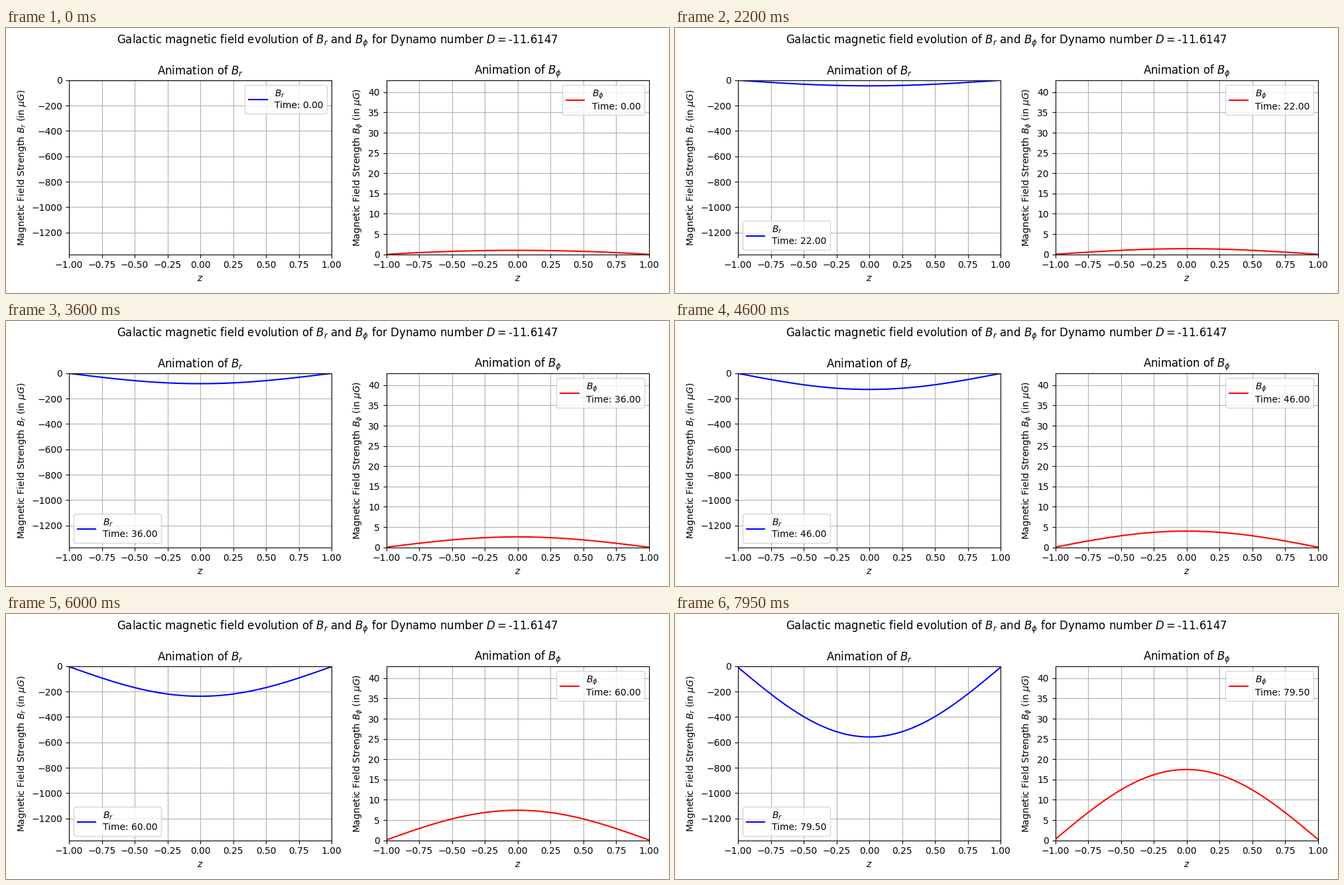
Animation of 1000 by 400 pixels, one loop 8 s. Source, as a matplotlib script:

```python
import matplotlib.pyplot as plt
import numpy as np
from matplotlib.animation import FuncAnimation

FRAMES = 160
INTERVAL = 50       # ms
TIME_STEP = 0.5

GROWTH = 0.0439     # rate of the growing dynamo mode
DECAY = 0.26        # rate of the decaying mode
AMP_R = 17.0
AMP_PHI = 0.533

z = np.linspace(-1, 1, 101)
mode = np.cos(0.99 * np.pi / 2 * z)
seed = 1 - z**2


def field_r(t):
    return -AMP_R * (np.exp(GROWTH * t) - np.exp(-DECAY * t)) * mode


def field_phi(t):
    grown = AMP_PHI * mode
    return grown * np.exp(GROWTH * t) + (seed - grown) * np.exp(-DECAY * t)


def label(name, t):
    return f"{name}\nTime: {t:.2f}"


def make_panel(ax, name, color, ylim, loc):
    line, = ax.plot(z, np.zeros_like(z), color=color, label=label(name, 0))
    ax.set_xlim(-1, 1)
    ax.set_ylim(*ylim)
    ax.set_title(f"Animation of {name}")
    ax.set_xlabel("$z$")
    ax.set_ylabel(rf"Magnetic Field Strength {name} (in $\mu G$)")
    ax.grid(True)
    text = ax.legend(loc=loc).get_texts()[0]
    return name, line, text


fig, (ax_r, ax_phi) = plt.subplots(1, 2, figsize=(10, 4), dpi=100)
fig.suptitle(r"Galactic magnetic field evolution of $B_r$ and $B_\phi$ "
             r"for Dynamo number $D = $-11.6147")

panels = [
    (make_panel(ax_r, "$B_r$", "blue", (-1372, 0), "best"), field_r),
    (make_panel(ax_phi, r"$B_\phi$", "red", (0, 42.95), "upper right"), field_phi),
]
fig.tight_layout()


def update(frame):
    t = frame * TIME_STEP
    artists = []
    for (name, line, text), field in panels:
        line.set_ydata(field(t))
        text.set_text(label(name, t))
        artists += [line, text]
    return artists


anim = FuncAnimation(fig, update, frames=FRAMES, interval=INTERVAL,
                     repeat=True, repeat_delay=0)
plt.show()
```
